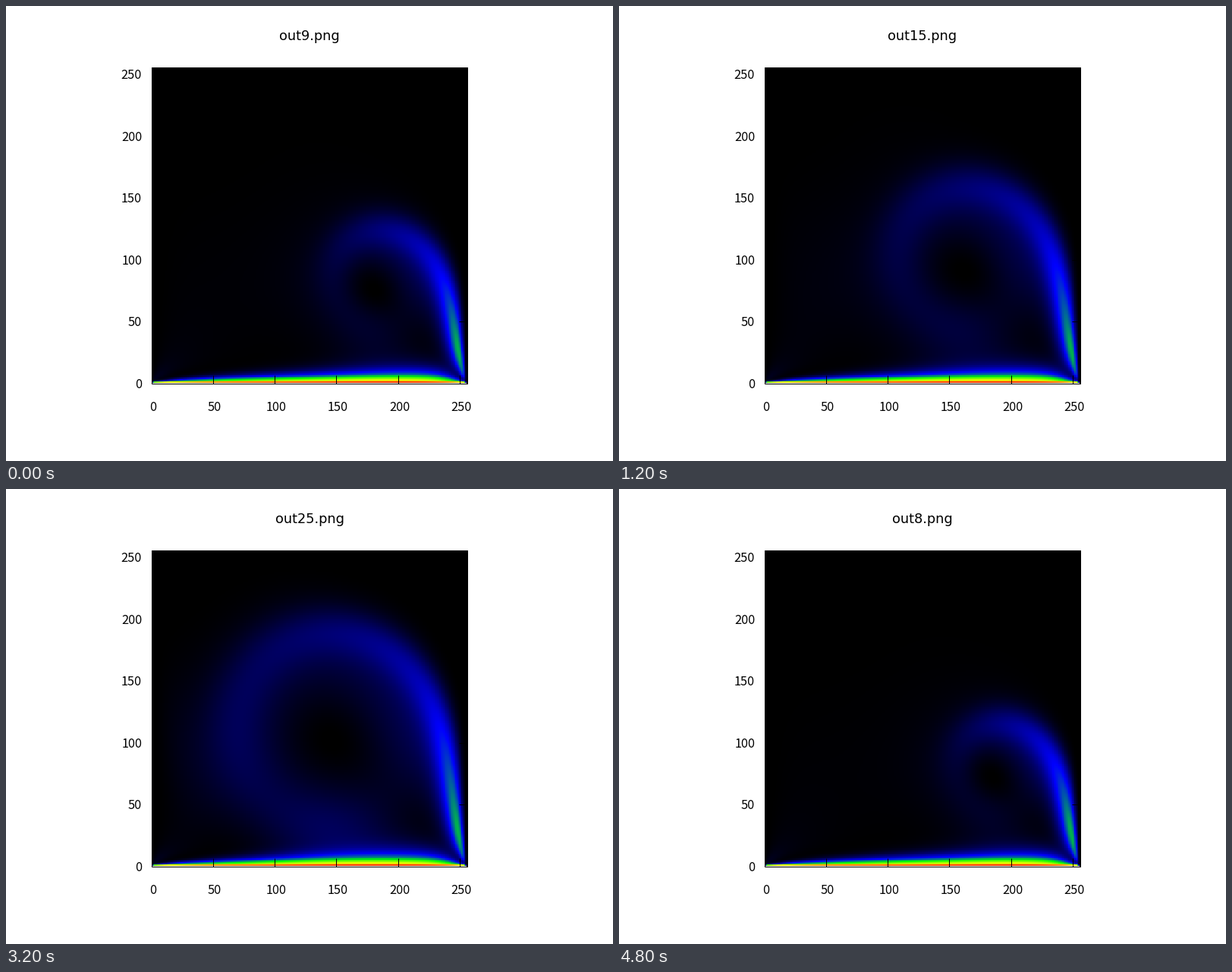
These frames come from a looping animation (800x600 px, 5 s). A matplotlib script:

```python
import numpy as np
import matplotlib.pyplot as plt
from matplotlib.animation import FuncAnimation
from matplotlib.colors import LinearSegmentedColormap

# Flow in a square box whose bottom wall slides to the right.
REYNOLDS = 1000
CELLS = 84
DT = 0.0025
STEPS_PER_SAMPLE = 8
MAX_SAMPLES = 800

# The time scale is fixed by the vortex eye: it drifts left past EYE_X at output EYE_OUTPUT.
EYE_X, EYE_OUTPUT = 0.652, 13
OUTPUTS, FIRST = 25, 9
NODES = 256

LEFT, RIGHT, TOP, BOTTOM = 191.5, 607.5, 80.5, 497.5
SCALE_X = (RIGHT - LEFT) / NODES
SCALE_Y = (BOTTOM - TOP) / NODES
TICK = 11


def wall_grid(stretch=1.15):
    s = np.linspace(-1, 1, CELLS + 1)
    return 0.5 * (1 + np.tanh(stretch * s) / np.tanh(stretch))


def second_derivative(x):
    d2 = np.zeros((x.size, x.size))
    for i in range(1, x.size - 1):
        a, b = x[i] - x[i - 1], x[i + 1] - x[i]
        d2[i, i - 1:i + 2] = 2 / (a * (a + b)), -2 / (a * b), 2 / (b * (a + b))
    return d2


def eye_position(x, psi):
    ridge = psi.max(axis=0)
    i = int(np.clip(ridge.argmax(), 1, x.size - 2))
    a, b, _ = np.polyfit(x[i - 1:i + 2] - x[i], ridge[i - 1:i + 2], 2)
    return x[i] - b / (2 * a) if a < 0 else x[i]


def simulate():
    """Vorticity and stream function; returns speed components per output."""
    x = wall_grid()
    h = x[1]
    d1 = np.gradient(np.eye(x.size), x, axis=0)
    d2 = second_derivative(x)
    d1t, d2t = d1.T.copy(), d2.T.copy()
    lam, vec = np.linalg.eig(d2[1:-1, 1:-1])
    lam, vec = lam.real, vec.real
    inv = np.linalg.inv(vec)
    vec_t, inv_t = vec.T.copy(), inv.T.copy()
    denom = -(lam[:, None] + lam[None, :])
    inner = (slice(1, -1), slice(1, -1))

    w = np.zeros((x.size, x.size))
    psi = np.zeros_like(w)
    previous = None
    history, hit, last_eye = [], None, 0
    step = 0
    while len(history) < MAX_SAMPLES:
        psi[inner] = vec @ ((inv @ w[inner] @ inv_t) / denom) @ vec_t
        u, v = d1 @ psi, -(psi @ d1t)
        for f in (u, v):
            f[[0, -1]] = 0
            f[:, [0, -1]] = 0
        u[0, 1:-1] = 1

        if step % STEPS_PER_SAMPLE == 0:
            history.append((u, v))
            if hit is None and step * DT > 0.8:
                eye = eye_position(x, psi)
                if eye <= EYE_X < last_eye:
                    hit = len(history) - 1
                last_eye = eye
            if hit and len(history) > OUTPUTS * hit / EYE_OUTPUT + 1:
                break

        w[:, 0] = -2 * psi[:, 1] / h**2
        w[:, -1] = -2 * psi[:, -2] / h**2
        w[0] = -2 * (psi[1] - h) / h**2
        w[-1] = -2 * psi[-2] / h**2
        # rows run along y, columns along x
        rate = (d2 @ w + w @ d2t) / REYNOLDS - u * (w @ d1t) - v * (d1 @ w)
        if previous is None:
            previous = rate
        w[inner] += DT * (1.5 * rate - 0.5 * previous)[inner]
        previous = rate
        step += 1

    spacing = (hit or len(history) / 2) / EYE_OUTPUT
    picks = [min(round(k * spacing), len(history) - 1) for k in range(1, OUTPUTS + 1)]
    return x, [history[i] for i in picks]


def energy_map(x, u, v):
    """Squared speed on the plotting nodes, averaged over each quad."""
    nodes = np.linspace(0, 1, NODES)
    weights = np.array([np.interp(nodes, x, e) for e in np.eye(x.size)]).T
    e = (weights @ u @ weights.T)**2 + (weights @ v @ weights.T)**2
    return (e[1:, 1:] + e[1:, :-1] + e[:-1, 1:] + e[:-1, :-1]) / 4


grid, flows = simulate()
maps = [energy_map(grid, u, v) for u, v in flows]

fig = plt.figure(figsize=(8, 6), dpi=100, facecolor="white")
ax = fig.add_axes([0, 0, 1, 1])
ax.axis("off")
palette = LinearSegmentedColormap.from_list(
    "flow", ["black", "blue", "#00ff00", "yellow", "red"], N=1024)
image = ax.imshow(maps[0], cmap=palette, vmin=0, vmax=1, origin="lower",
                  interpolation="nearest", aspect="auto",
                  extent=(LEFT, LEFT + (NODES - 1) * SCALE_X,
                          BOTTOM, BOTTOM - (NODES - 1) * SCALE_Y))
ax.set_xlim(0, 800)
ax.set_ylim(600, 0)


def stroke(xs, ys):
    ax.plot(xs, ys, color="black", lw=0.72, solid_capstyle="butt")


def label(x, y, text, size, font, align):
    return ax.text(x, y, text, fontsize=size * 0.72, family=font,
                   ha=align, va="baseline", color="black")


stroke([LEFT, RIGHT, RIGHT, LEFT, LEFT], [TOP, TOP, BOTTOM, BOTTOM, TOP])
stroke([RIGHT - 1] * 2, [TOP, BOTTOM])
for value in range(0, 251, 50):
    px, py = LEFT + value * SCALE_X, BOTTOM - value * SCALE_Y
    if value:
        stroke([px, px], [BOTTOM, BOTTOM - TICK])
        stroke([px, px], [TOP, TOP + TICK])
        stroke([LEFT, LEFT + TICK], [py, py])
        stroke([RIGHT, RIGHT - TICK], [py, py])
    label(px + 2, 534, str(value), 16.3, "Noto Sans CJK JP", "center")
    label(179, py + 6, str(value), 16.3, "Noto Sans CJK JP", "right")
title = label(400, 45, "", 17.8, "DejaVu Sans", "center")


def draw(frame):
    index = (frame + FIRST - 1) % OUTPUTS
    image.set_data(maps[index])
    title.set_text(f"out{index + 1}.png")
    return image, title


anim = FuncAnimation(fig, draw, frames=OUTPUTS, interval=200, repeat=True,
                     repeat_delay=0, blit=False)
plt.show()
```
